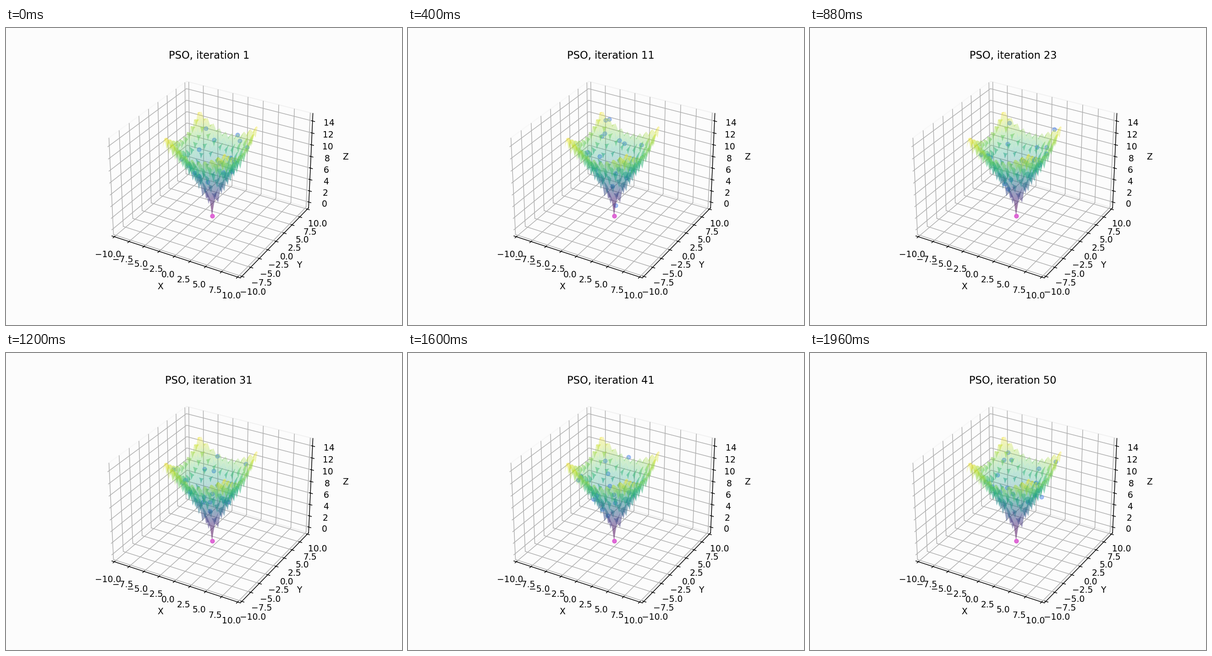
A matplotlib script that plays this animation: 864 px wide and 648 px high, repeating every 2 s.

```python
import numpy as np
import matplotlib.pyplot as plt
from matplotlib.animation import FuncAnimation

W, H, DPI = 864, 648, 135
FRAMES, STEP = 50, 40
SWARM = 16
BG = "#fcfcfc"


def ackley(x, y):
    r = np.sqrt((x**2 + y**2) / 2)
    c = (np.cos(2 * np.pi * x) + np.cos(2 * np.pi * y)) / 2
    return -20 * np.exp(-0.2 * r) - np.exp(c) + np.e + 20


def padded(lo, hi):
    m = (hi - lo) / 48
    return lo - m, hi + m


rng = np.random.default_rng(7)
REACH = rng.uniform(3.2, 4.8, (2, SWARM))
SPEED = rng.uniform(0.25, 0.9, (2, SWARM))
PHASE = rng.uniform(0, 2 * np.pi, (2, SWARM))


def swarm(i):
    """Particles keep overshooting the optimum, so each axis oscillates."""
    x, y = REACH * np.sin(SPEED * i + PHASE)
    return x, y, ackley(x, y)


def dots(points, color, alpha, zorder):
    return ax.plot(*points, ls="none", marker="o", ms=20**0.5, mew=1,
                   color=color, alpha=alpha, zorder=zorder)[0]


fig = plt.figure(figsize=(W / DPI, H / DPI), dpi=DPI, facecolor=BG)
ax = fig.add_subplot(projection="3d", facecolor=BG, computed_zorder=False)

axis = np.arange(-5, 5, 0.25)
X, Y = np.meshgrid(axis, axis)
Z = ackley(X, Y)
ax.plot_surface(X, Y, Z, cmap="viridis", alpha=0.3, zorder=3)
particles = dots(swarm(0), "cornflowerblue", 0.55, 2)
dots(([0], [0], [0]), "#dc5ad2", 0.9, 4)

margin = 0.05 * np.ptp(Z)
ax.set_xlim(*padded(-10, 10))
ax.set_ylim(*padded(-10, 10))
ax.set_zlim(*padded(Z.min() - margin, Z.max() + margin))
ax.set(xlabel="X", ylabel="Y", zlabel="Z")
for a in (ax.xaxis, ax.yaxis, ax.zaxis):
    a.pane.fill = False
title = ax.set_title("")


def update(i):
    particles.set_data_3d(*swarm(i))
    title.set_text(f"PSO, iteration {i + 1}")
    return particles, title


anim = FuncAnimation(fig, update, frames=FRAMES, interval=STEP,
                     repeat=True, repeat_delay=0, blit=False)
plt.show()
```
